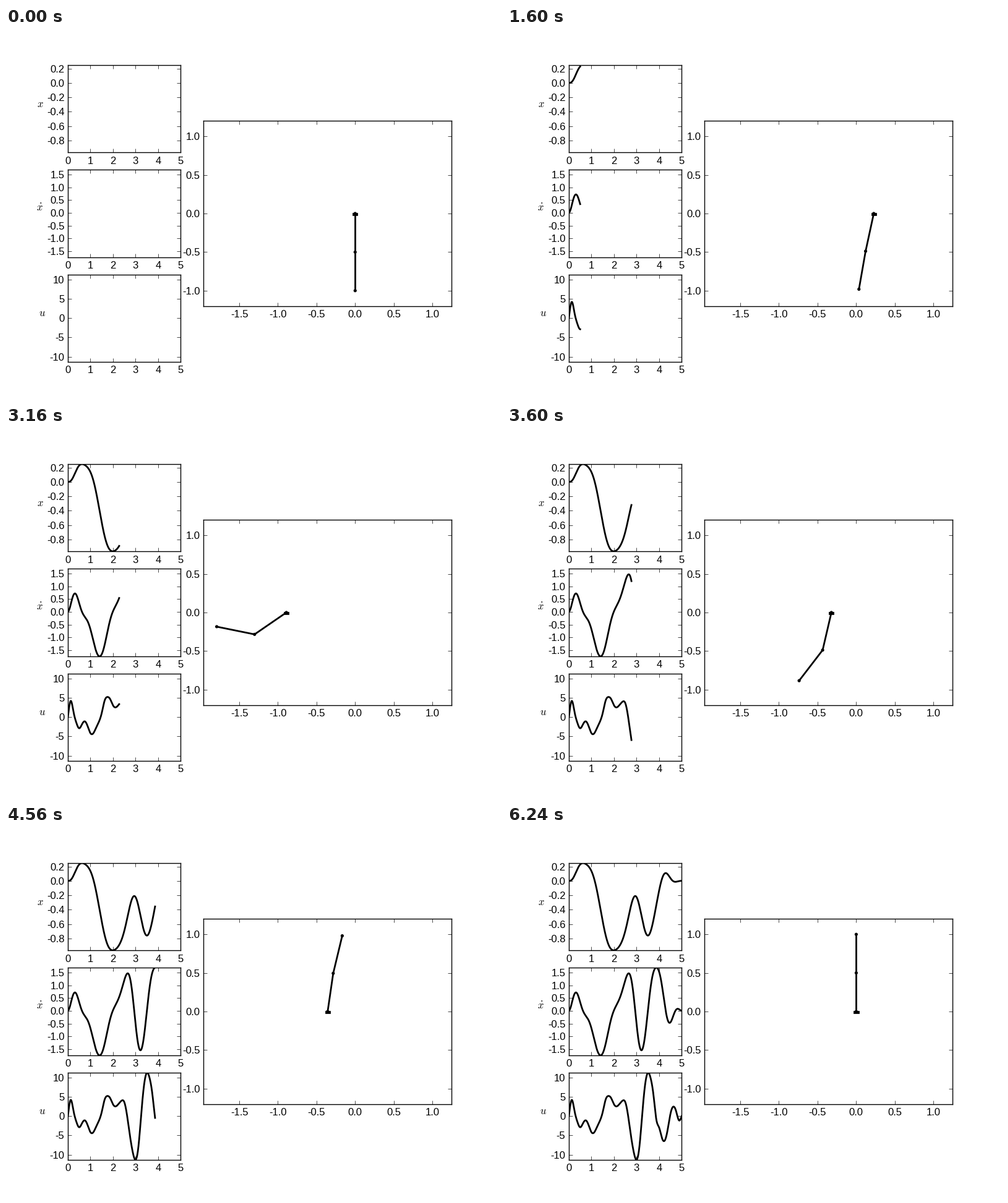
Animation, 800 px wide and 600 px high, one loop 6.72 s. Source, as a matplotlib script:

```python
import numpy as np
import matplotlib.pyplot as plt
from matplotlib.animation import FuncAnimation
from matplotlib.patches import Circle, Rectangle

plt.rcParams.update({
    "font.family": "Liberation Sans", "font.size": 12,
    "mathtext.fontset": "cm", "axes.unicode_minus": False,
    "axes.linewidth": 1.0,
    "xtick.direction": "in", "ytick.direction": "in",
    "xtick.top": True, "ytick.right": True,
    "xtick.major.size": 4, "ytick.major.size": 4,
    "xtick.major.width": 0.5, "ytick.major.width": 0.5,
    "xtick.major.pad": 4.6, "ytick.major.pad": 4,
})

END, STEPS, SUB, KNOTS = 5.0, 110, 10, 41
FRAMES, INTERVAL, HOLD = 168, 40, 29
ROD, GRAVITY = 0.5, 9.81
H = END / STEPS
DT = H / SUB

# (time, value) marks: turning points of the input and points it passes
PEAKS = np.array([
    (0, 0), (0.118, 4.15), (0.5, -2.9), (0.74, -1.1), (1.06, -4.45),
    (1.77, 5.2), (2.1, 2.5), (2.43, 4.1), (3.0, -11.3), (3.505, 11.2),
    (4.215, -6.5), (4.63, 2.45), (4.93, -1.0), (5, 0)])
PASSES = np.array([(0.3, 0), (1.455, 0), (3.227, -1.2), (3.85, 0)])

# Cart speed (two shoulders, then points of no acceleration) and position
SPEEDS = np.array([
    (0.74, -0.18), (2.02, 0.06),
    (0, 0), (0.3, 0.72), (1.43, -1.73), (2.68, 1.45), (3.24, -1.52),
    (3.84, 1.67), (4.47, -0.46), (4.84, 0.08), (5, 0)])
PLACES = np.array([
    (0.5, 0.229), (0.62, 0.247), (1.4545, -0.486), (1.97, -0.966),
    (2.2727, -0.891), (2.96, -0.209), (3.227, -0.502), (3.52, -0.76),
    (4.3, 0.114), (4.59, -0.002), (4.75, -0.008), (5, 0)])

# Rod angles from hanging, at given steps
POSE_STEPS = np.array([11, 32, 50, 71, 101])
POSES = np.array([[-0.215, 0.434, -0.969, 1.782, 3.129],
                  [-0.173, 1.031, -1.771, 1.699, 3.153]])


def spline_basis(t):
    """Matrix taking knot values to a natural cubic spline at times t."""
    gap = END / (KNOTS - 1)
    eye = np.eye(KNOTS)
    tri = 4 * np.eye(KNOTS - 2) + np.eye(KNOTS - 2, k=1) + np.eye(KNOTS - 2, k=-1)
    bend = np.zeros((KNOTS, KNOTS))
    bend[1:-1] = np.linalg.solve(tri, 6 * np.diff(eye, 2, axis=0))
    i = np.clip((t / gap).astype(int), 0, KNOTS - 2)
    b = (t / gap - i)[:, None]
    a = 1 - b
    return (a * eye[i] + b * eye[i + 1]
            + ((a**3 - a) * bend[i] + (b**3 - b) * bend[i + 1]) / 6)


def integrate(m):
    out = np.zeros_like(m)
    out[1:] = np.cumsum((m[1:] + m[:-1]) / 2, axis=0) * DT
    return out


def ease(t, marks):
    """Half-cosine path through the marks."""
    i = np.clip(np.searchsorted(marks[:, 0], t, side="right") - 1, 0, len(marks) - 2)
    (t0, v0), (t1, v1) = marks[i].T, marks[i + 1].T
    return v0 + (v1 - v0) * (1 - np.cos(np.pi * (t - t0) / (t1 - t0))) / 2


def rows(marks):
    return np.rint(marks[:, 0] / DT).astype(int)


def conditions(*parts):
    """Stack (matrix, values, tolerance) parts into one linear system."""
    lhs = np.vstack([m / tol for m, _, tol in parts])
    rhs = np.concatenate([np.broadcast_to(v, len(m)) / tol for m, v, tol in parts])
    return lhs, rhs


time = np.linspace(0, END, STEPS * SUB + 1)
A = spline_basis(time)
V = integrate(A)
X = integrate(V)
SLOPE = np.gradient(A, DT, axis=0)
A_NODES = A[::SUB]
EYE = np.eye(KNOTS)
JERK = np.diff(EYE, 3, axis=0)
rough = ease(np.linspace(0, END, KNOTS), PEAKS)

# Input curve
lhs, rhs = conditions(
    (A[rows(PEAKS)], PEAKS[:, 1], 0.05),
    (A[rows(PASSES)], PASSES[:, 1], 0.1),
    (SLOPE[rows(PEAKS)[1:-1]], 0, 4),
    (EYE, rough, 0.6),
    (JERK, 0, 4))
control = A @ np.linalg.lstsq(lhs, rhs, rcond=None)[0]

# Cart acceleration
LHS, RHS = conditions(
    (V[rows(SPEEDS)], SPEEDS[:, 1], 0.015),
    (X[rows(PLACES)], PLACES[:, 1], 0.004),
    (A[rows(SPEEDS)[2:]], 0, 0.8),
    (EYE, rough, 1.5),
    (JERK, 0, 2))


def angular(q, u):
    """Angular accelerations of two rods on a cart accelerated by u."""
    p = np.pad(q, [(0, 0)] * (q.ndim - 1) + [(2, 2)], mode="edge")
    w = (8 * (p[..., 3:-1] - p[..., 1:-3]) - (p[..., 4:] - p[..., :-4])) / (12 * H)
    a1, a2 = q[..., 0, :], q[..., 1, :]
    c, s = np.cos(a1 - a2), np.sin(a1 - a2)
    r1 = -12 * (GRAVITY * np.sin(a1) + u * np.cos(a1)) - 2 * s * w[..., 1, :]**2
    r2 = -4 * (GRAVITY * np.sin(a2) + u * np.cos(a2)) + 2 * s * w[..., 0, :]**2
    det = 133 / 9 - 4 * c**2
    return np.stack([(7 / 3 * r1 - 2 * c * r2) / det,
                     (19 / 3 * r2 - 2 * c * r1) / det], axis=-2)


def unpack(z):
    c = z[..., :KNOTS]
    inner = z[..., KNOTS:].reshape(z.shape[:-1] + (2, STEPS - 1))
    edge = np.zeros(inner.shape[:-1] + (1,))
    return c, np.concatenate([edge, inner, edge + np.pi], axis=-1)


def residual(z, tol):
    c, q = unpack(z)
    a = angular(q, c @ A_NODES.T)
    mid = (np.diff(q, 2, axis=-1) / H**2
           - (a[..., 2:] + 10 * a[..., 1:-1] + a[..., :-2]) / 12)
    first = (q[..., 1] - q[..., 0]) / H**2 - a[..., 0] / 3 - a[..., 1] / 6
    last = (q[..., -2] - q[..., -1]) / H**2 - a[..., -1] / 3 - a[..., -2] / 6
    pose = (q[..., POSE_STEPS] - POSES) / 0.006
    flat = z.shape[:-1] + (-1,)
    return np.concatenate([
        mid.reshape(flat) / tol, first / tol, last / tol,
        pose.reshape(flat), c @ LHS.T - RHS], axis=-1)


def solve_motion():
    """Fit acceleration and angles to the marks and the equations of motion."""
    c = np.linalg.lstsq(LHS, RHS, rcond=None)[0]
    at = np.concatenate([[0], POSE_STEPS, [STEPS]])
    inner = np.arange(1, STEPS)
    guess = [np.interp(inner, at, np.concatenate([[0], p, [np.pi]])) for p in POSES]
    z = np.concatenate([c, *guess])
    eps = 1e-6
    nudge = eps * np.eye(len(z))
    for tol in (30, 8, 2, 1):
        damp = 0.01
        r = residual(z, tol)
        for _ in range(25):
            jac = (residual(z + nudge, tol) - r) / eps
            normal = jac @ jac.T
            normal[np.diag_indices_from(normal)] *= 1 + damp
            trial = z - np.linalg.solve(normal, jac @ r)
            r_new = residual(trial, tol)
            old, new = r @ r, r_new @ r_new
            if new < old:
                z, r, damp = trial, r_new, damp / 5
                if old - new < 1e-5 * old:
                    break
            else:
                damp *= 6
    return unpack(z)


knots, angles = solve_motion()
signals = [X @ knots, V @ knots, control]
cart_x = signals[0][::SUB]
joint_x = cart_x + ROD * np.sin(angles[0])
joint_y = -ROD * np.cos(angles[0])
tip_x = joint_x + ROD * np.sin(angles[1])
tip_y = joint_y - ROD * np.cos(angles[1])

fig = plt.figure(figsize=(8, 6), dpi=100, facecolor="white")
fig.subplots_adjust(left=0.125, right=0.9, bottom=0.1, top=0.9, wspace=0.2, hspace=0.2)

PANELS = [
    ("$x$", (55, 124), (-0.967, 0.248), np.arange(-4, 2) / 5),
    (r"$\dot{x}$", (54.5, 291), (-1.73, 1.68), np.arange(-3, 4) / 2),
    ("$u$", (59, 462), (-11.35, 11.25), np.arange(-10, 11, 5)),
]
curves = []
for row, (label, (lx, ly), limits, ticks) in enumerate(PANELS):
    ax = plt.subplot2grid((3, 3), (row, 0), fig=fig)
    ax.set_xlim(0, END)
    ax.set_ylim(limits)
    ax.set_xticks(range(6))
    ax.set_yticks(ticks)
    fig.text(lx / 800, 1 - ly / 600, label, ha="center", va="center")
    curves += ax.plot([], [], color="black", lw=2)

stage = plt.subplot2grid((3, 3), (0, 1), rowspan=3, colspan=2, fig=fig)
stage.set_xlim(-1.967, 1.248)
stage.set_ylim(-1.2, 1.2)
stage.set_aspect("equal")
stage.set_xticks(np.arange(-3, 3) / 2)
stage.set_yticks(np.arange(-2, 3) / 2)

CART_W, CART_H = 0.05, 0.02
cart = stage.add_patch(Rectangle((0, -CART_H), CART_W, CART_H, color="black", lw=2))
dots = [stage.add_patch(Circle((0, 0), 0.015, color="black", lw=1)) for _ in range(3)]
rods = [stage.plot([], [], color="black", lw=2)[0] for _ in range(2)]


def draw(n):
    k = min(max(n - HOLD, 0), STEPS)
    shown = k * SUB + 1 if k else 0
    for curve, values in zip(curves, signals):
        curve.set_data(time[:shown], values[:shown])
    points = [(cart_x[k], 0), (joint_x[k], joint_y[k]), (tip_x[k], tip_y[k])]
    cart.set_x(cart_x[k] - CART_W / 2)
    for dot, point in zip(dots, points):
        dot.center = point
    for rod, start, stop in zip(rods, points, points[1:]):
        rod.set_data(*zip(start, stop))
    return [*curves, cart, *dots, *rods]


anim = FuncAnimation(fig, draw, frames=FRAMES, interval=INTERVAL, repeat=True)
plt.show()
```
